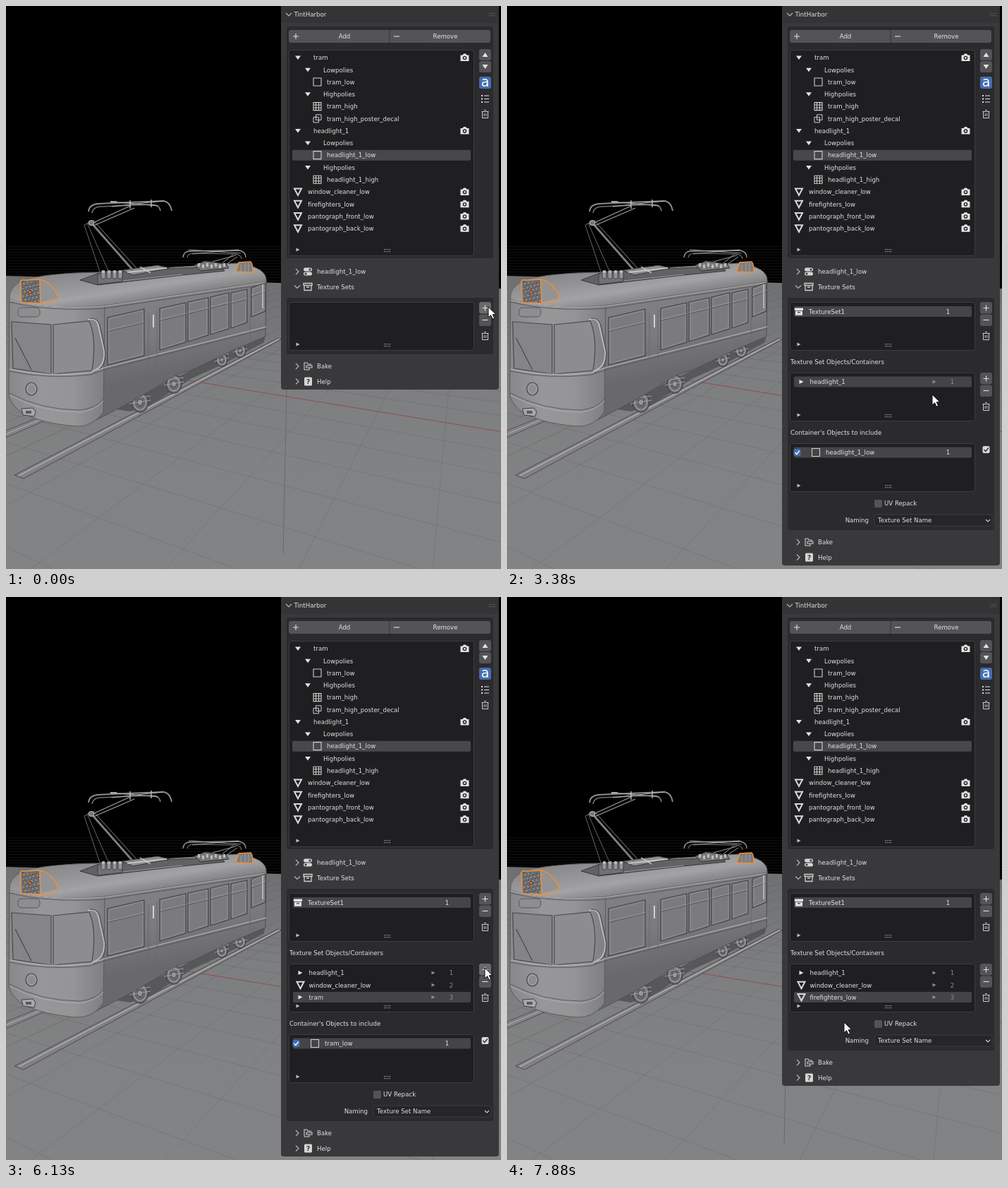
An HTML page with a canvas that plays this animation: 702 by 797 pixels, repeating every 8000 ms.

```html
<!DOCTYPE html>
<html lang="en">
<head>
<meta charset="utf-8">
<title>Texture set panel</title>
<style>
html, body { margin: 0; width: 100%; height: 100%; overflow: hidden; background: #000; }
canvas { display: block; }
</style>
</head>
<body>
<canvas id="stage" width="702" height="797"></canvas>
<script>
const W = 702, H = 797, LOOP = 8000, STEP = 125;
const screen = document.getElementById('stage').getContext('2d');
const backdrop = document.createElement('canvas');
backdrop.width = W;
backdrop.height = H;
let g = backdrop.getContext('2d');

const BLUE = '#446eb0', TEXT = '#e2e2e2', DIM = '#8d8d8f';

// ---------- drawing helpers ----------
function shape(d, fill, stroke, width = 1) {
  const path = new Path2D(d);
  if (fill) { g.fillStyle = fill; g.fill(path); }
  if (stroke) { g.strokeStyle = stroke; g.lineWidth = width; g.stroke(path); }
}
const line = (d, color, width) => shape(d, null, color, width);
function box(x, y, w, h, fill, r = 0, stroke) {
  g.beginPath();
  g.roundRect(x, y, w, h, r);
  if (fill) { g.fillStyle = fill; g.fill(); }
  if (stroke) { g.strokeStyle = stroke; g.lineWidth = 1; g.stroke(); }
}
function text(s, x, y, color = TEXT, align = 'left', font = '8.6px "DejaVu Sans", sans-serif') {
  g.font = font;
  g.fillStyle = color;
  g.textAlign = align;
  g.textBaseline = 'alphabetic';
  g.fillText(s, x, y + 3.3);
}
function disc(x, y, rx, ry, fill, stroke, width = 1) {
  g.beginPath();
  g.ellipse(x, y, rx, ry, 0, 0, 7);
  if (fill) { g.fillStyle = fill; g.fill(); }
  if (stroke) { g.strokeStyle = stroke; g.lineWidth = width; g.stroke(); }
}
function gradient(x0, y0, x1, y1, ...colors) {
  const fill = g.createLinearGradient(x0, y0, x1, y1);
  colors.forEach((c, i) => fill.addColorStop(i / (colors.length - 1), c));
  return fill;
}

// ---------- 3D viewport ----------
function drawFloor() {
  box(0, 0, W, H, '#000');
  for (let y = 340; y < 400; y += 4) box(0, y, W, 1, '#101010');
  shape('M0 382L702 400V797H0Z', gradient(0, 380, 0, 797, '#6e6f71', '#7d7e80', '#818284', '#828385'));
  g.save();
  g.beginPath();
  g.rect(0, 402, W, H);
  g.clip();
  const horizon = 338;
  for (let k = -1; k < 26; k++) {
    line(`M-912 ${horizon}L${1887 - 260 * (k - 4)} 797`, 'rgba(70,70,74,.18)');
    line(`M646 ${horizon}L${-1675 + 190 * k} 797`, 'rgba(70,70,74,.18)');
  }
  g.restore();
  line('M0 637L110 586', '#767a52');
  line('M240 527L702 602.5', '#98504f');
  line('M398 540L393 775', '#69696c');
}

function drawRails() {
  shape('M0 601L90 565L92 571L0 611Z', '#828284', '#505052');
  line('M0 606L90 568', '#b0b0b2');
  shape('M12 664L386 470L390 472L25 669Z', '#828284', '#4a4a4c');
  line('M18 665L388 471', '#b8b8ba', 1.2);
}

function drawWheel(x, y, r) {
  disc(x, y, r * .8, r * .95, '#69696b', '#39393b');
  disc(x, y, r * .58, r * .7, null, '#a8a8aa', 1.2);
  disc(x, y, r * .25, r * .3, '#959597', '#404042');
  line(`M${x - r} ${y - 5}l${2 * r} -4M${x - r} ${y + 2}l${2 * r} -5`, '#a0a0a2');
}

function drawWindow(x0, x1, top0, top1, bottom0, bottom1) {
  shape(`M${x0} ${top0}L${x1} ${top1}V${bottom1}L${x0} ${bottom0}Z`, '#7b7b7d', '#454547', 1.2);
  shape(`M${x0 + 2} ${top0 + 2}L${x1 - 2} ${top1 + 2}V${bottom1 - 2}L${x0 + 2} ${bottom0 - 2}Z`, null, '#9c9c9e', .7);
  const bar0 = top0 + (bottom0 - top0) * .27, bar1 = top1 + (bottom1 - top1) * .27;
  line(`M${x0} ${bar0}L${x1} ${bar1}`, '#a3a3a5', .8);
  line(`M${x0} ${bar0 + 1.5}L${x1} ${bar1 + 1.5}`, '#515153', .8);
}

function drawBody() {
  // running gear
  shape('M150 570L368 465L366 476L310 506L262 528L205 565L176 574Z', '#58585a');
  [[190, 561, 15], [238, 535, 14], [306, 501, 10], [332, 488, 10]].forEach(w => drawWheel(...w));
  // side and front
  shape('M128 424L369 389L368 468L325 486L262 516Q240 520 216 538L178 560L128 586Z',
    gradient(240, 400, 262, 515, '#818183', '#7c7c7e', '#69696b'), '#505052');
  shape('M5 414Q60 430 140 424L138 575Q122 597 98 595Q45 590 20 574Q4 561 4 548Z',
    gradient(4, 0, 140, 0, '#88888a', '#979799', '#959597', '#7f7f81'), '#5a5a5c');
  // roof
  shape('M5 415Q3 399 24 388Q60 378 130 377L328 364Q371 370 369 390L140 424Q55 431 5 415Z',
    gradient(130, 375, 138, 425, '#8b8b8d', '#969698', '#a3a3a5', '#858587'), '#626264');
  line('M5 416Q60 430 140 425L369 391', '#b0b0b2');
  line('M5 419Q60 433 140 428L369 394', '#58585a');
  // front glass
  shape('M8 447L64 451V521L10 513Z', '#858587', '#4a4a4c', 1.2);
  shape('M67 451L118 446Q129 470 122 516L67 521Z', '#8d8d8f', '#4a4a4c', 1.2);
  line('M116 444Q128 440 131 453L139 488Q141 512 122 517', '#bababc', 1.8);
  line('M119 442Q132 441 134 456L141 490Q142 514 124 519', '#48484a');
  line('M13 470L36 515', '#444446', 1.1);
  box(17, 427, 31, 13, '#8e8e90', 5, '#58585a');
  line('M5 514Q60 526 120 519L140 512L369 454', '#b8b8ba', 1.2);
  line('M5 517Q60 529 120 522L140 515L369 457', '#58585a');
  line('M5 548Q50 572 105 572Q127 570 138 556', '#5e5e60');
  line('M5 551Q50 575 105 575Q127 572 138 559', '#adadaf');
  disc(36, 542, 8, 9, '#8e8e90', '#48484a', 1.2);
  disc(36, 542, 6, 7, null, '#a8a8aa');
  shape('M22 570L38 569L42 574L40 581L24 579Z', '#a8a8aa', '#404042');
  box(28, 573, 8, 4, '#5a5a5c');
  // side windows
  drawWindow(144, 196, 441, 429, 508, 495);
  drawWindow(218, 255, 428, 420, 487, 476);
  drawWindow(258, 287, 419, 413, 475, 466);
  drawWindow(290, 316, 412, 406, 465, 457);
  drawWindow(319, 342, 406, 401, 456, 448);
  drawWindow(348, 368, 399, 392, 440, 432);
  line('M202 434V540M214 430V532M346 397V474', '#6a6a6c');
  line('M209 437V455', '#d0d0d2', 2);
  line('M364 394V428', '#c2c2c4', 1.5);
}

function drawRoofGear() {
  shape('M105 388L132 378L250 371L306 369L310 375L250 381L130 395Z', '#626264', '#39393b');
  line('M130 393L250 380', '#9b9b9d');
  shape('M130 379L165 376V390L130 394Z', '#727274', '#404042');
  for (let x = 138; x < 170; x += 8) {
    box(x - 3, 375, 6, 11, '#959597', 2, '#454547');
    disc(x, 376, 2.5, 2, '#bcbcbe');
  }
  shape('M165 374L215 367L232 371L180 381Z', '#8f8f91', '#3a3a3c');
  line('M172 377L228 371M190 369L205 378', '#d0d0d2', 1.3);
  // front pantograph
  line('M111 310L134 379M115 307L146 377M111 310L126 303', '#818183', .8);
  line('M121 307L180 374', '#6d6d70', 3);
  line('M120 306L178 372M126 306L185 371', '#a9a9ab', .8);
  line('M121 308L176 283M124 311L182 286', '#a0a0a2', 1.2);
  disc(121, 307, 4, 3.5, '#77777a', '#c5c5c7');
  line('M117 291Q118 281 130 280L150 279L224 276Q233 278 235 290', '#8d8d8f', 1.8);
  line('M122 293Q123 285 133 284L205 281Q218 281 219 290', '#737375', 1.7);
  line('M148 277L216 283M150 284L222 276', '#b8b8ba');
  line('M148 277h9M176 275v12M206 274v11', '#c5c5c7', 1.3);
  // rear pantograph
  line('M251 356Q252 347 261 347L331 346Q340 348 340 356', '#98989a', 1.3);
  line('M257 356Q258 350 266 350L323 351Q334 352 334 358', '#79797b', 1.2);
  line('M259 345L333 350M264 351L330 345', '#b5b5b7', .8);
  line('M326 353L278 366M322 352L300 369M328 355L307 369', '#98989a');
  shape('M267 367L282 361L312 365L316 371L276 375Z', '#77777a', '#303032');
  for (let x = 272; x < 314; x += 6) box(x, 364 + x % 4, 3, 5, '#bcbcbe');
}

function drawHeadlights() {
  shape('M48 389Q67 394 74 413L50 419Z', '#939395');
  shape('M22 389L47 388L48 420L22 419Z', '#6a6a6c');
  for (let i = 0; i < 170; i++) {
    const x = 23 + (i * 7.31) % 24, y = 390 + (i * 11.77) % 29;
    box(x, y, 1, 1, i % 3 ? '#a5a5a7' : '#3d3d3f');
  }
  line('M22 419L20 391Q21 387 27 388L47 387Q65 390 74 412M48 388L49 421L22 420M49 421Q62 424 75 413', '#ee8e36', 1.5);
  disc(34, 405, 2.2, 2.2, '#ee7d28', '#3a2418', .8);
  shape('M326 376L330 363L347 362Q350 364 350 377Z', '#7d7d7f', '#ee8e36', 1.5);
  line('M333 366V376M339 364V376M344 364V376', '#a8a8aa', .8);
}

drawFloor();
drawRails();
drawBody();
drawRoofGear();
drawHeadlights();
g = screen;

// ---------- icons ----------
const triangleDown = (x, y) => shape(`M${x - 4} ${y - 2.5}h8l-4 5.5z`, TEXT);
const triangleRight = (x, y, r = 3, color = TEXT) => shape(`M${x - r} ${y - r}L${x + r} ${y}L${x - r} ${y + r}Z`, color);
const chevronDown = (x, y) => line(`M${x - 4} ${y - 2}l4 4l4 -4`, '#b5b5b7', 1.2);
const chevronRight = (x, y) => line(`M${x - 2} ${y - 4}l4 4l-4 4`, '#b5b5b7', 1.2);
const plus = (x, y) => line(`M${x - 4} ${y}h8M${x} ${y - 4}v8`, TEXT, 1.1);
const minus = (x, y) => line(`M${x - 4} ${y}h8`, TEXT, 1.1);
const meshIcon = (x, y) => line(`M${x - 5} ${y - 4.5}h10l-5 9.5z`, '#d9d9d9', 2);
const square = (x, y) => line(`M${x - 5.5} ${y - 5.5}h11v11h-11z`, '#cfcfcf', 1.1);
function gridIcon(x, y) {
  square(x, y);
  line(`M${x - 2} ${y - 5.5}v11M${x + 2} ${y - 5.5}v11M${x - 5.5} ${y - 2}h11M${x - 5.5} ${y + 2}h11`, '#cfcfcf');
}
function copyIcon(x, y) {
  line(`M${x - 2} ${y - 5.5}h7.5v7.5h-7.5zM${x - 5.5} ${y - 2}h7.5v7.5h-7.5z`, '#cfcfcf');
}
function camera(x, y) {
  shape(`M${x - 6} ${y - 3.5}h3l1.5 -2h3l1.5 2h3v8.5h-12z`, TEXT);
  disc(x, y + .5, 2.8, 2.8, '#222224');
  disc(x, y + .5, 1.4, 1.4, TEXT);
}
function trash(x, y) {
  line(`M${x - 5} ${y - 3.5}h10M${x - 1.5} ${y - 5.5}h3M${x - 4} ${y - 3.5}v9h8v-9M${x - 1.3} ${y - 1}v4M${x + 1.3} ${y - 1}v4`, '#cfcfcf');
}
function archive(x, y) {
  box(x - 6, y - 5, 12, 3.5, TEXT);
  box(x - 5, y - .7, 10, 6, TEXT);
  box(x - 2, y + .6, 4, 1.3, '#444');
}
function archiveOutline(x, y) {
  line(`M${x - 6} ${y - 5}h12v3h-12zM${x - 5} ${y - 2}v7h10v-7M${x - 2} ${y + .5}h4`, '#cfcfcf', 1.3);
}
function tick(x, y, fill, mark) {
  box(x - 5, y - 5, 10, 10, fill, 2);
  line(`M${x - 3} ${y}l2.3 2.5l4 -5`, mark, 1.4);
}
function toggles(x, y) {
  for (const [dy, knob] of [[-3, 3], [3, -3]]) {
    box(x - 6, y + dy - 2.5, 12, 5, '#d5d5d5', 2.5);
    disc(x + knob, y + dy, 1.5, 1.5, '#333');
  }
}
function bakeIcon(x, y) {
  line(`M${x - 5} ${y + 5}v-10h4l1 2h4v2M${x - 5} ${y + 5}h7v-3`, '#cfcfcf', 1.1);
  line(`M${x - 2} ${y - 1}h8v3h-8z`, '#cfcfcf', 1.1);
}
function helpIcon(x, y) {
  box(x - 5, y - 6, 11, 12, '#d5d5d5', 1.5);
  text('?', x + .5, y, '#333', 'center', 'bold 9px "DejaVu Sans", sans-serif');
}

// ---------- panel ----------
function listFrame(y, h) {
  box(401.5, y + .5, 262, h - 1, '#1f1e20', 3, '#3d3d3f');
  triangleRight(414, y + h - 9, 2.5, '#c0c0c0');
  for (let i = 0; i < 8; i++) box(536 + (i % 4) * 2.6, y + h - 10 + (i >> 2) * 3, 1.3, 1.3, '#a0a0a0');
}
function addRemove(y, cursor) {
  const hovered = cursor.x > 671 && cursor.y > y && cursor.y < y + 17;
  box(671, y, 17, 16.5, hovered ? '#6a6a6c' : '#545456', 3);
  box(671, y + 17.5, 17, 16.5, '#545456', 3);
  plus(679.5, y + 8.5);
  minus(679.5, y + 25.5);
  trash(679.5, y + 48);
}
function heading(y, label, icon, open) {
  (open ? chevronDown : chevronRight)(413, y);
  icon(428, y);
  text(label, 441, y);
}

const tree = [
  ['tram'], ['Lowpolies', 1], ['tram_low', 2, square], ['Highpolies', 1],
  ['tram_high', 2, gridIcon], ['tram_high_poster_decal', 2, copyIcon],
  ['headlight_1'], ['Lowpolies', 1], ['headlight_1_low', 2, square],
  ['Highpolies', 1], ['headlight_1_high', 2, gridIcon],
  ['window_cleaner_low', 3], ['firefighters_low', 3], ['pantograph_front_low', 3], ['pantograph_back_low', 3]
];

function drawObjectList() {
  box(398, 29, 293, 328, '#2b2a2c', 3);
  box(401, 34, 286, 18, '#545456', 3);
  box(543.5, 34, 1, 18, '#343436');
  plus(411, 43);
  text('Add', 480, 43, TEXT, 'center');
  minus(554, 43);
  text('Remove', 623, 43, TEXT, 'center');
  listFrame(62, 292);
  tree.forEach(([name, level = 0, icon], i) => {
    const y = 73 + i * 17.27;
    if (name === 'headlight_1_low') box(406, y - 7.5, 253, 15, '#48484b', 2);
    if (level === 3) meshIcon(414, y);
    else if (icon) icon(441.5, y);
    else triangleDown(level ? 428 : 414, y);
    text(name, [436, 450, 455, 428][level], y);
    if (level % 3 === 0) camera(650.5, y);
  });
  box(671, 61, 17, 16, '#545456', 3);
  box(671, 78, 17, 16, '#545456', 3);
  shape('M675.5 72h8l-4 -6z', TEXT);
  shape('M675.5 83h8l-4 6z', TEXT);
  box(671, 100, 17, 17, BLUE, 3);
  text('a', 679.5, 111, '#fff', 'center', '19px "DejaVu Sans", sans-serif');
  for (let i = 0; i < 3; i++) {
    box(674, 126 + i * 4.5, 2, 2, TEXT);
    box(678, 126.5 + i * 4.5, 7, 1, TEXT);
  }
  trash(679.5, 153);
}

function drawSetRows({ rows, menu }, cursor) {
  rows.forEach((name, i) => {
    const y = 532 + i * 17.27, active = i === rows.length - 1;
    if (active) {
      const hot = menu || (cursor.x > 407 && cursor.x < 611 && Math.abs(cursor.y - y) < 8.5);
      box(407, y - 7.5, 252, 15, hot ? '#353537' : '#444447', 2);
      if (hot) box(407, y - 7.5, 204, 15, BLUE, 2);
    }
    if (name.endsWith('low')) meshIcon(417.5, y);
    else triangleRight(417.5, y);
    text(name, 429.5, y);
    triangleRight(606, y, 2.5, active && menu ? '#d0d0d0' : DIM);
    text(i + 1, 631.5, y, DIM, 'center');
  });
}

function drawMenu({ rows, menu }, cursor) {
  const top = 532 + (rows.length - 1) * 17.27 + 9.5;
  const height = menu.length * 19.1 + 30;
  box(406, top, 209, height, '#181819', 3);
  menu.forEach((name, i) => {
    const y = top + 10.5 + i * 19.1;
    if (Math.abs(cursor.y - y) < 9.5) box(407, y - 8, 204, 16, BLUE, 2);
    text(name, 414, y);
    const key = name.includes('back') ? 11 : 0;
    box(414 + g.measureText(name.slice(0, key)).width, y + 5, 4.5, 1, '#b5b5b5');
  });
  const divider = top + menu.length * 19.1 + 2;
  box(407, divider, 207, 1, '#303032');
  text('Choose Object', 412, divider + 14, DIM);
}

function drawPanel(state, cursor) {
  const { hasSet, rows, menu } = state;
  const current = rows[rows.length - 1];
  const isContainer = current && !current.endsWith('low');
  const bodyEnd = !hasSet ? 493 : !current ? 593 : isContainer ? 742 : 642;

  box(390, -4, 309, bodyEnd + 54, '#39383a', 4);
  box(390, 0, 309, 24, '#343335');
  chevronDown(401, 12);
  text('TintHarbor', 408.5, 12);
  for (let i = 0; i < 8; i++) box(685 + (i % 4) * 2.5, 10 + (i >> 2) * 3, 1.2, 1.2, '#656567');

  drawObjectList();
  heading(376, 'headlight_1_low', toggles);
  heading(397.5, 'Texture Sets', archiveOutline, true);
  box(398, 413, 293, bodyEnd - 413, '#2b2a2c', 3);
  listFrame(419, 69);
  addRemove(419, cursor);

  if (hasSet) {
    box(407, 425, 252, 15, '#454548', 2);
    archive(414, 432.5);
    text('TextureSet1', 428, 432.5);
    text('1', 625.5, 432.5, TEXT, 'center');
    text('Texture Set Objects/Containers', 402, 504);
    listFrame(519, 69);
    addRemove(519, cursor);
    drawSetRows(state, cursor);
  }
  if (isContainer) {
    text("Container's Objects to include", 402, 604);
    listFrame(619, 69);
    box(407, 624.5, 252, 15, '#454548', 2);
    tick(411.5, 632, BLUE, '#fff');
    square(438, 632);
    text(current + '_low', 452, 632);
    text('1', 625.5, 632, TEXT, 'center');
    tick(679.5, 628, '#d9d9d9', '#2b2a2c');
  }
  if (current) {
    const y = bodyEnd - 38;
    box(521, y - 5, 11, 11, '#545456', 2);
    text('UV Repack', 535, y);
    text('Naming', 513, y + 24, TEXT, 'right');
    box(521, y + 16, 167, 16, '#262527', 3, '#3d3d3f');
    text('Texture Set Name', 526, y + 24);
    line(`M679 ${y + 23}l3 3l3 -3`, '#cfcfcf', 1.2);
  }
  heading(bodyEnd + 17, 'Bake', bakeIcon);
  heading(bodyEnd + 38.5, 'Help', helpIcon);
  if (menu) drawMenu(state, cursor);
}

// ---------- timeline ----------
const meshes = tree.slice(11).map(([name]) => name);
const [cleaner, fighters] = meshes;
const states = [
  { at: 0, rows: [] },
  { at: 125, hasSet: true, rows: [] },
  { at: 1500, hasSet: true, rows: ['tram'] },
  { at: 2375, hasSet: true, rows: ['tram'], menu: ['tram', 'headlight_1', ...meshes] },
  { at: 3000, hasSet: true, rows: ['headlight_1'] },
  { at: 4125, hasSet: true, rows: ['headlight_1', 'tram'] },
  { at: 5000, hasSet: true, rows: ['headlight_1', 'tram'], menu: ['tram', ...meshes] },
  { at: 5625, hasSet: true, rows: ['headlight_1', cleaner] },
  { at: 6125, hasSet: true, rows: ['headlight_1', cleaner, 'tram'] },
  { at: 6625, hasSet: true, rows: ['headlight_1', cleaner, 'tram'], menu: ['tram', ...meshes.slice(1)] },
  { at: 7625, hasSet: true, rows: ['headlight_1', cleaner, fighters] }
];
const cursorPath = [
  [0, 684, 426], [500, 684, 426], [875, 676, 475], [1125, 679, 525], [1500, 679, 525],
  [2250, 526, 534], [2375, 526, 534], [2750, 515, 568], [3000, 515, 568], [3375, 603, 550],
  [3750, 679, 525], [4125, 679, 525], [4875, 505, 547], [5000, 505, 547], [5500, 486, 585],
  [5625, 486, 585], [6000, 679, 525], [6125, 679, 525], [6500, 515, 562], [6625, 515, 562],
  [7125, 490, 618], [7500, 478, 602], [LOOP, 478, 602]
];

function cursorAt(t) {
  const i = cursorPath.findIndex(key => key[0] > t);
  const [t0, x0, y0] = cursorPath[i - 1], [t1, x1, y1] = cursorPath[i];
  const p = (t - t0) / (t1 - t0), ease = p * p * (3 - 2 * p);
  return { x: x0 + (x1 - x0) * ease, y: y0 + (y1 - y0) * ease };
}

function drawCursor({ x, y }) {
  shape(`M${x} ${y}v15l3.6 -3.3l2.4 5.4l2.6 -1.2l-2.4 -5.2h4.8z`, '#fff', '#111', 1);
}

function render(now) {
  const t = Math.floor((now % LOOP) / STEP) * STEP;
  const cursor = cursorAt(t);
  g.drawImage(backdrop, 0, 0);
  drawPanel(states.findLast(s => s.at <= t), cursor);
  drawCursor(cursor);
}

const start = performance.now();
function animate() {
  render(performance.now() - start);
  requestAnimationFrame(animate);
}
animate();
</script>
</body>
</html>
```
